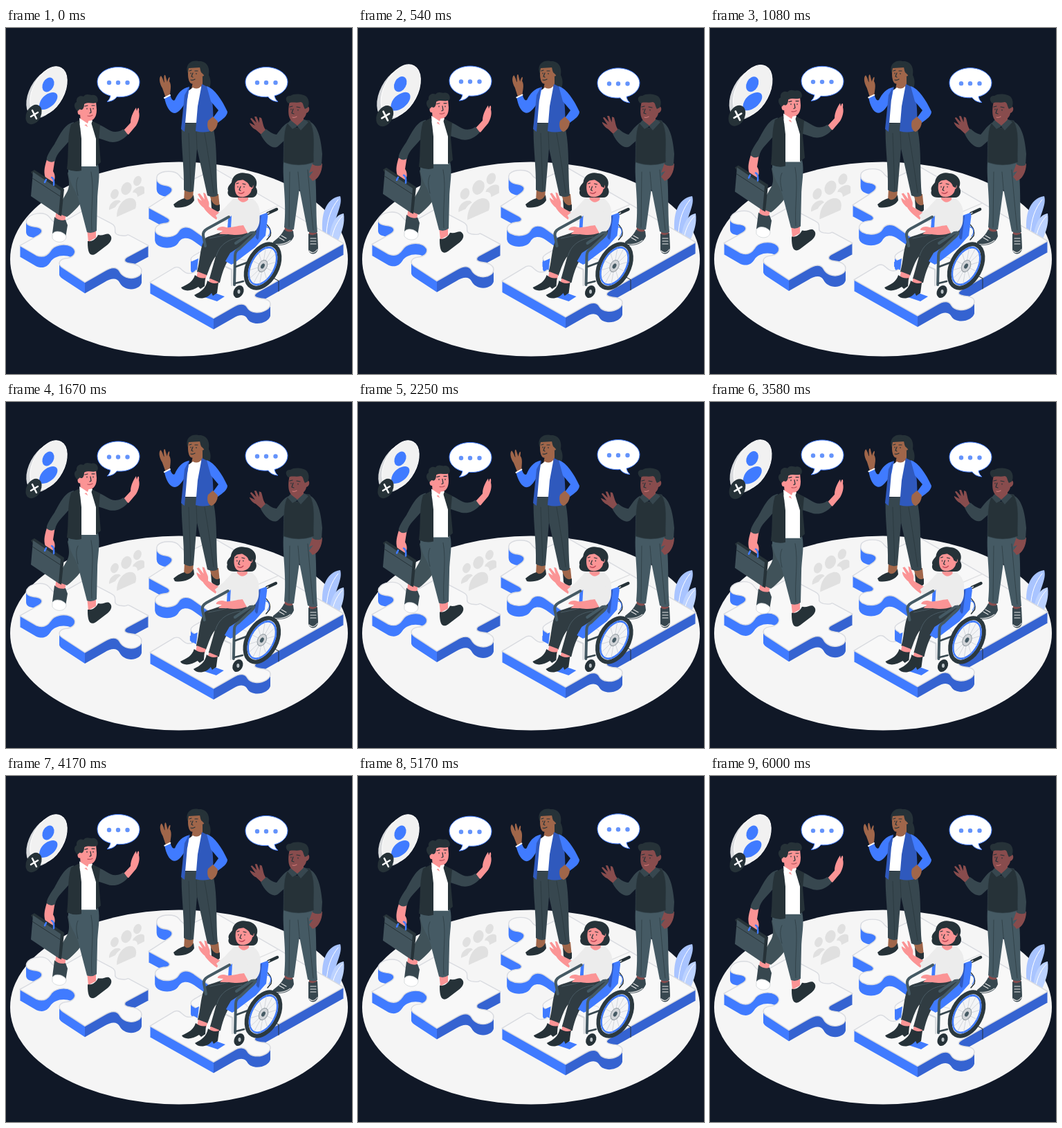
These frames come from a looping animation (500 by 500 pixels, 6.04 s). An HTML page:

```html
<!DOCTYPE html>
<html lang="en">
<head>
<meta charset="utf-8">
<title>Inclusive team</title>
<style>
html, body { margin: 0; width: 100%; height: 100%; overflow: hidden; background: #101827; }
svg { display: block; width: 100%; height: 100%; }
.line { fill: none; stroke-linecap: round; stroke-linejoin: round; }
.blue { fill: #407bff; }
.navy { fill: #2f59bd; }
.dark { fill: #263238; }
.slate { fill: #37474f; }
.steel { fill: #455a64; }
.pants { fill: #303c42; }
.pink { fill: #fb9495; }
.brown { fill: #a0664a; }
.deep { fill: #884c4d; }
.white { fill: #fff; }
.pale { fill: #ececec; }
.grey { fill: #e0e0e0; }
.ink { stroke: #263238; }
.fold { stroke: #263238; stroke-width: 1; opacity: .6; }
.lace { stroke: #e8e8e8; stroke-width: 1.1; }
.seam { stroke: #dfe0e2; stroke-width: 1.3; }
.top { fill: #f8f8f8; stroke: #d9dbe0; stroke-width: 1.4; stroke-linejoin: round; }
</style>
</head>
<body>
<svg viewBox="0 0 500 500">
<defs>
  <linearGradient id="sideA" gradientUnits="userSpaceOnUse" x1="20" x2="206" y1="0" y2="0">
    <stop offset=".505" stop-color="#407bff"/><stop offset=".505" stop-color="#3563d1"/>
  </linearGradient>
  <linearGradient id="sideB" gradientUnits="userSpaceOnUse" x1="206" x2="488" y1="0" y2="0">
    <stop offset=".334" stop-color="#407bff"/><stop offset=".334" stop-color="#3563d1"/>
  </linearGradient>
  <path id="pieceA" d="M20 316L44 330C54 334 60 330 64 324C69 315 84 312 94 317C104 323 100 332 89 334C77 335 73 342 82 348L114 369L142 353C152 347 160 346 164 353C168 361 178 365 187 362C197 359 199 350 191 345C186 341 176 343 172 339C170 335 174 333 178 331L206 316L180 302C172 297 181 304 164 301C151 298 164 290 152 284L114 264L82 282C72 288 68 281 62 274C54 266 35 269 30 278C27 286 35 288 44 289C54 291 54 297 47 301Z"/>
  <path id="pieceB" d="M208 369L300 421L328 405C339 398 346 400 349 406C353 413 366 415 376 409C385 403 384 395 373 393C361 392 354 389 364 383L488 313L302 205L271 220C261 225 254 220 250 214C244 207 226 207 219 214C215 222 221 228 231 229C242 231 243 237 234 243L206 261L230 274C241 279 236 284 228 284C215 286 212 294 220 300C231 306 245 303 249 296C254 287 264 288 272 294L300 314L272 330C264 335 267 339 273 342C280 349 273 357 263 356C254 355 253 344 243 348Z"/>
</defs>

<ellipse cx="250" cy="334" rx="244" ry="140.500" fill="#f5f5f5"/>

<g id="crowd" class="grey">
  <ellipse cx="190" cy="221" rx="5.500" ry="7.500" transform="rotate(25 190 221)"/>
  <path d="M184 235C189 229 198 226 200 231V239L190 244C190 239 187 237 183 238Z"/>
  <ellipse cx="157" cy="240" rx="5.500" ry="7.500" transform="rotate(25 157 240)"/>
  <path d="M149 263C148 254 157 247 164 249L166 251C161 254 159 257 158 259Z"/>
  <ellipse cx="174" cy="232" rx="7.200" ry="9.500" transform="rotate(25 174 232)"/>
  <path d="M160 273C160 258 168 248 177 246C187 244 190 252 187 261Z"/>
</g>

<g>
  <path fill="#a9c4ff" d="M458 300C454 270 462 246 483 243C487 257 475 270 470 305Z"/>
  <path fill="#bcd2ff" d="M467 305C469 283 476 270 488 268C490 282 486 293 480 307Z"/>
  <path class="line" stroke="#fff" d="M463 298C464 276 470 260 480 248M471 303C474 288 480 278 486 272"/>
</g>

<g class="piece" data-id="pieceA" data-side="sideA"></g>
<g class="piece" data-id="pieceB" data-side="sideB">
  <path class="line seam" d="M300 316L328 332C338 338 346 334 349 341L394 367M302 316L336 296C350 290 342 282 352 276L394 258"/>
  <path class="line ink" stroke-width="1" d="M394 367V382M364 350L394 367"/>
</g>

<g id="coin">
  <ellipse cx="56" cy="95" rx="22.500" ry="38" transform="rotate(28 56 95)" fill="#d8dadd"/>
  <ellipse cx="61.500" cy="91" rx="22.500" ry="38" transform="rotate(28 61.500 91)" fill="#f1f1f1" stroke="#fff"/>
  <ellipse class="blue" cx="61" cy="82" rx="7.800" ry="11" transform="rotate(28 61 82)"/>
  <path class="blue" d="M48 117C47 105 54 97 63 94C71 91 76 95 74 102C71 112 57 121 48 117Z"/>
  <ellipse class="dark" cx="40" cy="125" rx="10.500" ry="15" transform="rotate(28 40 125)"/>
  <path class="line" stroke="#fff" stroke-width="2.500" d="M36 128L46 122M38 119L44 131"/>
</g>

<g id="bubbleL">
  <path class="white" stroke="#407bff" d="M151 98C150 102 149 104 146 106.500C153 106 158 103 160 99.500C180 101 193 91 193 78C193 66 179 56.500 162 56.500S132 66 132 78C132 87 139 95 151 98Z"/>
  <g fill="#6493fb"><circle cx="149" cy="79" r="3.200"/><circle cx="162" cy="79" r="3.200"/><circle cx="175.500" cy="79" r="3.200"/></g>
</g>
<g id="bubbleR">
  <path class="white" stroke="#407bff" d="M388 98C389 102 390 104 393 106.500C386 106 381 103 379 99.500C359 101 346 91 346 78C346 66 360 56.500 376 56.500S407 66 407 78C407 87 400 95 388 98Z"/>
  <g fill="#6493fb"><circle cx="363" cy="79" r="3.200"/><circle cx="376" cy="79" r="3.200"/><circle cx="389.500" cy="79" r="3.200"/></g>
</g>

<!-- standing woman -->
<g>
  <path class="brown" d="M258 232H271L270 248L257 250ZM294 240L307 240L309 260L299 258Z"/>
  <path class="dark" d="M242 255C249 249 254 247 258 246C262 251 268 247 271 241L272 249C268 257 254 261 244 259ZM296 247C299 255 304 258 309 255L309 263C306 268 300 265 297 260Z"/>
  <path class="slate" d="M254 138C252 165 258 200 257 234Q264 239 271 236L276 174L291 242Q299 246 306 242C303 210 306 175 300 146L296 136Z"/>
  <path class="line fold" d="M276 174L275 150M287 152C292 180 296 210 300 238M264 152L267 234"/>
  <path class="dark" d="M262 64C259 52 268 46 278 48C290 47 295 57 293 68C297 76 296 84 293 88L281 88Z"/>
  <path class="brown" d="M271 72L284 70L284 86Q277 94 268 89Z"/>
  <path class="white" d="M262 92L270 86Q277 90 282 84L286 94L280 137H258Z"/>
  <path class="brown" d="M264 58C262 66 263 77 267 80C273 83 282 77 283 70C288 70 288 63 284 63L281 57Z"/>
  <path class="dark" d="M263 60C266 53 274 51 279 53C281 59 281 64 283 65L288 70L291 58L280 49L266 51Z"/>
  <path class="line ink" stroke-width="1.200" d="M265 62L268 61M273 62L277 62M267 65V66M275 65.500V66.500M267 75Q270 76 273 74M270 65L268 70L270 71"/>
  <g id="armW">
    <path class="brown" d="M231 101L226 87C221 79 221 71 224 69C228 75 227 77 229 79C227 67 230 65 231 71L233 78C235 69 238 69 236 77C240 83 237 90 237 99Z"/>
    <path class="blue" d="M229 101L237 96C239 104 242 106 244 104C248 95 254 87 265 85L262 103C255 115 250 123 243 123C236 122 231 112 229 101Z"/>
    <path class="line" stroke="#fff" stroke-width="2" d="M229 101L237 97"/>
  </g>
  <path class="navy" d="M265 84L258 97L253 146L258 150L262 103ZM283 81L291 85C301 96 299 130 300 147Q288 153 274 149L277 113Z"/>
  <path class="blue" d="M290 84C302 88 312 104 320 121C320 127 313 132 306 137L299 130L307 119L296 106Z"/>
  <path class="brown" d="M299 128L306 135C306 142 302 148 297 150C291 148 290 140 292 134Z"/>
</g>

<!-- right man -->
<g>
  <path class="deep" d="M403 286H415L413 300H402ZM438 290H449V306H438Z"/>
  <path class="slate" d="M386 309C393 304 399 298 402 291Q408 297 415 293L416 301C412 312 399 316 386 313ZM437 297Q444 302 450 296L451 317C451 329 438 329 437 320Z"/>
  <path class="line lace" d="M395 303L402 307M398 300L405 304M386 312Q400 315 411 307M440 304H448M440 308H448M440 312H448M438 322Q444 328 450 320"/>
  <path class="steel" d="M401 192C399 220 406 250 402 288Q409 293 416 291L424 232L436 294Q443 298 450 295C447 264 450 230 445 192Z"/>
  <path class="line fold" d="M424 232L422 208M436 205C439 240 441 264 444 292M410 208L409 288"/>
  <path class="deep" d="M411 122H430V139Q420 145 412 138ZM443 195L457 196C457 208 451 219 443 221L438 215L444 207L438 209Z"/>
  <path class="slate" d="M436 134C450 138 455 158 457 182L456 198Q449 201 443 197L440 160Z"/>
  <g id="armM">
    <path class="deep" d="M369 154L361 147C356 145 352 139 352 137L360 141L353 131L355 130L362 137L359 128L362 128L366 137L366 129L369 130C372 138 371 143 377 149Z"/>
    <path class="slate" d="M409 136C401 139 396 148 391 154C384 153 380 149 376 146L368 154C375 168 386 176 393 171L405 160Z"/>
  </g>
  <path class="dark" stroke="#37474f" stroke-width=".6" d="M407 137C400 148 402 168 401 194Q423 202 445 194C444 170 448 150 439 134L430 133L421 145Z"/>
  <path class="slate" d="M411 133L421 141L431 132L437 136L426 148L421 142L414 146L407 138Z"/>
  <path class="deep" d="M410 106C407 118 407 134 416 135C425 136 433 130 434 123C439 122 440 113 435 113L433 106Z"/>
  <path class="dark" d="M408 109C402 103 405 97 411 98C416 94 429 95 434 99C439 104 438 112 436 115L432 117C429 112 430 108 426 107C419 109 413 106 408 109Z"/>
  <path class="line ink" stroke-width="1.200" d="M410 114L414 113M420 114L425 115M412 117V118M422 118V119M415 117L413 123L416 124"/>
  <path class="line" stroke="#c77" stroke-width="1.200" d="M414 129Q417 130 420 128"/>
</g>

<!-- walking man -->
<g id="walker">
  <path class="pink" d="M73 262L87 268L85 280L71 276ZM117 290H130V303L119 309Z"/>
  <path class="slate" d="M70 273Q78 280 86 277L89 285L86 303L67 297Z"/>
  <path class="white" stroke="#c9ced2" stroke-width=".7" d="M67 298C70 291 84 294 87 301C87 311 72 312 67 304Z"/>
  <path class="dark" d="M118 308C125 309 130 305 133 299C140 301 145 296 149 298C155 302 152 309 147 313L130 326C122 331 118 326 118 310Z"/>
  <path fill="#405259" d="M92 203L118 238C109 254 98 266 88 273Q79 270 72 265L87 239C93 230 91 220 89 210Z"/>
  <path class="steel" d="M90 200L133 197C137 212 132 232 132 250L131 293Q124 298 117 295L104 245C100 232 91 225 90 206Z"/>
  <path class="line fold" d="M123 208C128 235 122 262 124 292M104 242C101 230 101 222 104 216"/>
  <path class="pink" d="M59 190L71 188L68 207C72 213 71 220 68 223L58 219C54 210 55 203 59 190Z"/>
  <path class="dark" d="M36 208L41 205L84 233L80 272L76 270Z"/>
  <path fill="#42545d" d="M39 208L79 235L76 270L36 243Z"/>
  <path class="line ink" d="M38 217L78 243"/>
  <path class="line" stroke="#407bff" stroke-width="2.500" d="M58 219L56 223M66 216Q70 217 69 227"/>
  <path class="white" d="M106 138L121 133L130 144L131 200H109Z"/>
  <path class="pink" d="M107 124H122V135L118 143L108 137ZM168 150L180 137C180 127 186 118 188 115L189 120C191 112 193 116 192 121C194 128 191 136 188 141L177 154Z"/>
  <path class="slate" d="M130 138C143 142 149 150 158 150C164 150 168 147 170 146L176 154C166 165 155 167 145 163L130 158ZM98 136C84 139 78 154 70 168C61 181 58 187 59 191Q65 196 71 192C73 180 84 173 94 160Z"/>
  <path class="dark" d="M106 133L94 139C88 158 91 182 88 204Q100 209 109 206V160ZM122 133L136 140L134 162L137 194L130 200V160Z"/>
  <path class="white" d="M106 130L107 144L116 139L120 146L125 134L121 130L118 138Z"/>
  <path class="pink" d="M109 109C108 118 109 133 118 134C127 135 131 128 131 118L130 106Z"/>
  <ellipse class="pink" cx="107" cy="121" rx="3.500" ry="4.500"/>
  <path class="dark" d="M102 119C97 113 99 108 102 107C101 99 108 97 112 99C116 94 121 97 124 97C130 95 135 102 132 107C127 111 120 106 113 110C113 115 111 119 108 118C105 116 105 122 102 119Z"/>
  <path class="line ink" stroke-width="1.200" d="M114 113L118 112M124 112L128 112M117 116V117M126 116V117M122 116L123 122L121 123"/>
  <path class="line" stroke="#b84d59" stroke-width="1.200" d="M118 127Q122 128 125 126"/>
</g>

<!-- seated woman -->
<g id="chair">
  <path class="line ink" stroke-width="1.500" d="M361 277C375 278 385 290 382 300L377 306"/>
  <path class="line" stroke="#407bff" stroke-width="1.200" d="M371 287C382 286 384 294 379 301"/>
  <path class="line" stroke="#d5d8dc" stroke-width="2" d="M313 343L326 349V372M331 345L366 331"/>
  <path class="line ink" stroke-width="4.500" d="M378 268L391 262"/>
  <path class="line" stroke="#ccd1d6" stroke-width="1.500" d="M366 275L380 267"/>
  <path class="blue" d="M363 272L377 267Q379 270 378 275L375 300L360 317L328 341L312 333Z"/>
  <path class="navy" d="M363 273L369 271L365 304L360 312Z"/>
  <path class="blue" d="M284 388L297 381L316 388L305 395ZM267 338L278 333L276 350L267 345Z"/>
  <path id="greet" class="pink" d="M304 277C295 271 288 264 286 260C279 255 276 248 277 246L283 250L277 240L280 239L287 248L285 238L288 239L292 249C295 255 292 257 294 259L309 267Z"/>
  <path class="pale" d="M328 247L350 244C364 248 369 262 366 275L361 294L322 297L321 280L309 281L303 271L315 261Z"/>
  <path class="pink" d="M335 236H350V248Q342 256 335 247Z"/>
  <path class="blue" d="M321 276L326 271L325 289L320 291Z"/>
  <path class="pants" d="M322 289L360 288C367 299 352 307 329 326C318 336 313 351 309 368Q299 370 294 362L303 330C297 337 294 348 290 358Q281 359 276 352C281 336 280 313 289 303C297 299 311 297 322 289Z"/>
  <path class="line" stroke="#4a5b64" d="M340 302C322 305 309 312 304 329M294 304C311 301 325 297 330 295"/>
  <path class="blue" d="M324 325L360 302L366 309L348 323L326 342L317 337Z"/>
  <path class="pale" d="M347 262C348 272 348 280 342 287L350 298C365 295 368 281 366 270Z"/>
  <path class="pink" d="M343 285C332 286 326 289 318 288C311 285 304 289 305 292L313 293L308 298L321 298C333 300 341 299 349 296ZM277 352L290 357L288 364L275 361ZM295 362L307 367L306 371L292 369Z"/>
  <path class="dark" d="M273 357Q281 363 288 361L287 373L281 377L278 374C268 381 256 381 253 375C263 370 270 367 273 357ZM291 365Q299 371 307 368L305 383L299 387L297 383C290 392 277 393 272 386C282 381 289 376 291 365Z"/>
  <path class="dark" d="M331 245C322 245 319 240 321 235C319 230 324 226 326 223C327 212 338 207 347 210C360 211 365 222 361 230C366 238 361 246 354 245Z"/>
  <path class="pink" d="M332 221C329 232 331 243 339 244C348 245 354 240 355 233C359 231 358 224 354 226L350 218Z"/>
  <path class="dark" d="M329 225C333 223 336 219 338 216C343 221 350 221 352 229L356 231L359 221L349 212L335 212Z"/>
  <path class="line ink" stroke-width="1.200" d="M333 225L336 224M342 225L346 226M335 229V230M344 229V230M339 229L337 234L339 235"/>
  <path class="line" stroke="#bd4656" stroke-width="1.300" d="M336 238Q340 241 344 237"/>
  <path class="line" stroke="#455a64" stroke-width="4" d="M288 315L285 300Q284 294 291 290L322 273M330 371L331 329Q331 322 337 319L358 299Q362 294 354 296L332 311"/>
  <path class="line" stroke="#37474f" stroke-width="2.500" d="M332 345L351 338M331 369L343 366"/>
  <ellipse class="dark" cx="336" cy="381" rx="7" ry="9.500" transform="rotate(28 336 381)"/>
  <ellipse cx="336.500" cy="381" rx="2" ry="3" fill="#b8c0c5"/>
  <g transform="translate(371 344) rotate(28)">
    <ellipse rx="20.800" ry="34" fill="#f3f4f6" stroke="#2c393f" stroke-width="6"/>
    <ellipse rx="16.800" ry="29" fill="none" stroke="#407bff" stroke-width="2.500"/>
    <g id="spokes" class="line" stroke="#c9ced4" stroke-width=".7"></g>
    <ellipse rx="6" ry="9" fill="#d2d5d9" stroke="#939ca2"/>
    <ellipse rx="2.500" ry="4" fill="#455a64"/>
  </g>
</g>
</svg>
<script>
const LOOP = 6040, HALF = LOOP / 2, DEPTH = 16;
const NS = "http://www.w3.org/2000/svg";
const get = id => document.getElementById(id);
const add = (parent, tag, attrs, before = null) => {
  const node = document.createElementNS(NS, tag);
  for (const key in attrs) node.setAttribute(key, attrs[key]);
  parent.insertBefore(node, before);
};

// Stack the outline downwards to give each piece its thickness.
const pieces = [...document.querySelectorAll(".piece")];
for (const g of pieces) {
  const { id, side } = g.dataset, first = g.firstChild;
  for (let y = DEPTH; y > 0; y--)
    add(g, "use", { href: "#" + id, y, fill: `url(#${side})` }, first);
  add(g, "use", { href: "#" + id, class: "top" }, first);
}
for (let i = 0; i < 12; i++) {
  const a = i * Math.PI / 6;
  add(get("spokes"), "path", { d: `M0 0L${16 * Math.cos(a)} ${28 * Math.sin(a)}` });
}

const frac = x => x - Math.floor(x);
const ramp = x => 1 - Math.abs(1 - 2 * frac(x));
const wave = x => 2 * ramp(x + .25) - 1;
const pulse = (t, peak) => Math.max(0, 1 - Math.abs(t - peak) / 755);
const place = (id, value) => get(id).setAttribute("transform", value);
const move = (id, x, y) => place(id, `translate(${x} ${y})`);
const grow = (id, x, y, k) => place(id, `translate(${x} ${y}) scale(${k}) translate(${-x} ${-y})`);

function draw(now) {
  const t = now % LOOP, sway = wave(t / HALF), swell = pulse(t, 755) + pulse(t, 3020);
  for (const g of pieces) g.setAttribute("transform", `translate(0 ${-1.5 - 10 * ramp(t / LOOP)})`);
  move("walker", 0, -9 * ramp(t / HALF));
  move("bubbleL", 0, -2 * sway);
  move("bubbleR", 0, 2 * sway);
  move("chair", -1.3 * wave(t / LOOP), 0);
  grow("coin", 58, 95, 1 + .1 * swell);
  grow("crowd", 174, 243, 1 + .21 * swell);
  place("armW", `rotate(${2.5 * sway} 250 112)`);
  place("armM", `rotate(${2.5 * sway} 394 160)`);
  place("greet", `rotate(${2 * sway} 308 272)`);
  requestAnimationFrame(draw);
}
draw(0);
</script>
</body>
</html>
```
